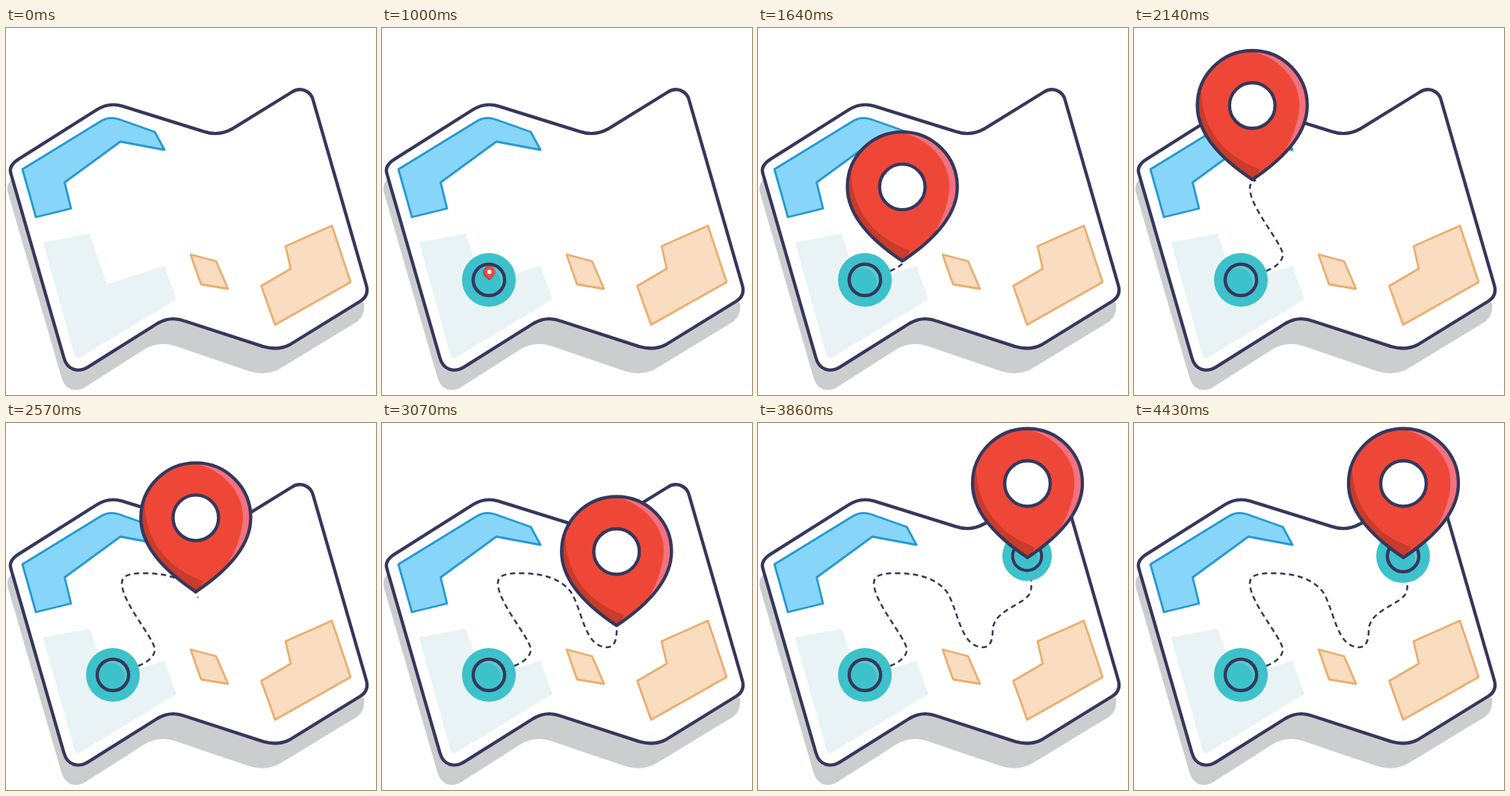
These frames come from a looping animation (495 by 491 pixels, 6 s). An HTML page:

```html
<!DOCTYPE html>
<html lang="en">
<head>
<meta charset="utf-8">
<title>Map route</title>
<style>
  html, body { margin: 0; width: 100%; height: 100%; overflow: hidden; background: #fff; }
  svg { display: block; width: 100%; height: 100%; }
  .ink { stroke: #36375b; stroke-width: 4.4; stroke-linejoin: round; }
  .water { fill: #88d5fa; stroke: #2399d5; }
  .block { fill: #fadcc1; stroke: #ebae6d; }
  .water, .block { stroke-width: 2.8; stroke-linejoin: round; }
</style>
</head>
<body>
<svg viewBox="0 0 495 491">
  <defs>
    <path id="route" d="M144 340 L177 325 C190 320 200 311 199 302 C196 285 155 240 155 214
      C155 202 170 201 185 201 C215 201 238 208 252 225 C268 248 270 300 301 300
      C312 300 314 288 314 277 C315 248 362 243 365 224 C368 210 361 195 361 183"/>
    <path id="body" d="M0 0 C-30 -20 -73.5 -55 -73.5 -99 A73.5 73.5 0 0 1 73.5 -99 C73.5 -55 30 -20 0 0Z"/>
    <clipPath id="inside"><use href="#body"/></clipPath>
    <clipPath id="disc"><circle r="20"/></clipPath>
    <mask id="trim" maskUnits="userSpaceOnUse" x="0" y="0" width="495" height="491">
      <use id="drawn" href="#route" fill="none" stroke="#fff" stroke-width="8"/>
    </mask>
    <g id="stop">
      <circle r="36" fill="#3dc1cb"/>
      <g clip-path="url(#disc)">
        <circle r="20" fill="#5bcad3"/>
        <circle cx="-4" cy="4" r="20" fill="#3dc1cb"/>
      </g>
      <circle class="ink" r="21" fill="none"/>
    </g>
  </defs>

  <path fill="#cccdcf" d="M2 218 L74 467 C79 484 92 488 105 481 L185 430 Q205 418 228 426
    L325 459 Q346 466 366 456 L468 394 Q481 386 479 368 L300 250 L20 195 Q0 202 2 218Z"/>
  <path class="ink" fill="#fff" d="M77.4 441 L6.6 195 Q3 184 17 175.3 L122 109 Q138 99 156 104.6
    L265 138.6 Q284 145 302 135.3 L382 86 C394 78 408 84 411 97 L482 344 Q486 358 474 365.5
    L380 423.5 Q364 432 344 426.2 L239 392 Q220 385 203 395 L110 453.3 C97 461.5 82 458 77.4 441Z"/>
  <path class="water" d="M22 189 L128 124 Q139 118 151 122 L199 139 212 163 153 152 78.5 206.5 87 241.5 40 253Z"/>
  <path fill="#e9f3f6" d="M49.5 287 L112 275 135 343 212 318 228 363 97 442 Q94 443 92 439Z"/>
  <path class="block" d="M247 303 L281 312 297 349 261 343Z M374 292 L436 264.5 461 340 360 397 341.5 345 381 322Z"/>

  <g mask="url(#trim)">
    <use href="#route" fill="none" stroke="#36375b" stroke-width="2.5" stroke-dasharray="7 5"/>
  </g>
  <use id="from" href="#stop"/>
  <use id="to" href="#stop"/>
  <g id="pin">
    <g clip-path="url(#inside)">
      <use href="#body" fill="#f2727f"/>
      <path fill="#ef4737" d="M-25 -175 C28 -174 64 -138 63 -98 C61 -68 47 -40 28 -16 L0 5 H-80 V-175Z"/>
      <path fill="#c93b2a" d="M-68 -130 C-72 -85 -50 -35 10 -14 L0 5 H-80 V-130Z"/>
    </g>
    <use href="#body" class="ink" fill="none"/>
    <circle class="ink" cy="-99" r="30.5" fill="#fff"/>
  </g>
</svg>
<script>
  const $ = id => document.getElementById(id);
  const route = $('route'), length = route.getTotalLength();
  const LOOP = 6000, FPS = 14;

  const progress = (t, start, end) => Math.min(1, Math.max(0, (t - start) / (end - start)));
  const ease = u => u * u * (3 - 2 * u);

  function place(id, x, y, scale) {
    $(id).setAttribute('transform', `translate(${x} ${y}) scale(${scale})`);
    $(id).style.display = scale ? '' : 'none';
  }

  function draw(t) {
    place('from', 143, 337, ease(progress(t, 60, 660)));
    place('to', 360, 178, ease(progress(t, 3360, 3960)));

    const way = length * progress(t, 1415, 3540);
    const tip = route.getPointAtLength(way);
    place('pin', tip.x - .5, tip.y - 3, ease(progress(t, 890, 1430)));
    $('drawn').setAttribute('stroke-dasharray', `${way && way + 5} 999`);
  }

  const begin = performance.now();
  function tick() {
    const t = (performance.now() - begin) % LOOP;
    draw(Math.floor((t + 3) * FPS / 1000) * 1000 / FPS);
    requestAnimationFrame(tick);
  }
  tick();
</script>
</body>
</html>
```
